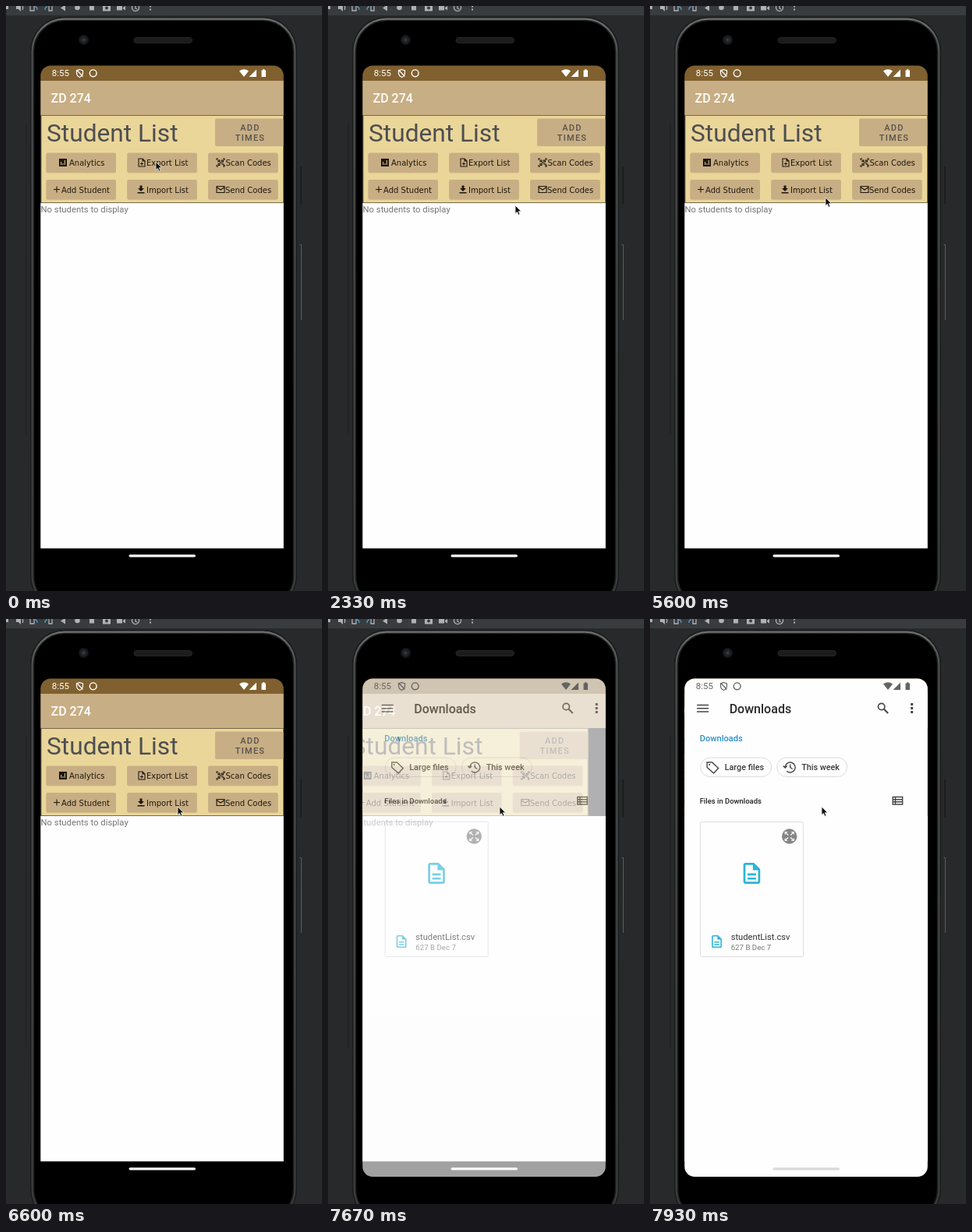
Animation of 405x751 px, one loop 8 s. Source, as an HTML page:

```html
<!DOCTYPE html>
<html lang="en">
<head>
<meta charset="utf-8">
<title>Student list</title>
<style>
html, body { margin: 0; width: 100%; height: 100%; overflow: hidden; background: #28292b; }
svg { display: block; width: 100vw; height: 100vh; }
text { font-family: Roboto, sans-serif; white-space: pre; }
.m { font-weight: 500; }
.label { font: 10px "DejaVu Sans", sans-serif; fill: #1d170d; }
.line { fill: none; stroke: currentColor; stroke-width: 2; }
.thin { stroke-width: 1.1; }
.solid { fill: currentColor; fill-rule: evenodd; }
</style>
</head>
<body>
<svg viewBox="0 0 405 751" preserveAspectRatio="none">
  <defs>
    <linearGradient id="rim" x2="0" y2="1">
      <stop offset="0" stop-color="#707171"/>
      <stop offset=".06" stop-color="#4c4d4d"/>
      <stop offset="1" stop-color="#3a3b3b"/>
    </linearGradient>
    <clipPath id="screen"><rect x="44.300" y="76.500" width="311.500" height="639.500" rx="13"/></clipPath>
    <clipPath id="import"><rect x="155" y="223" width="90" height="25.500" rx="2"/></clipPath>
  </defs>

  <!-- emulator toolbar -->
  <rect width="405" height="12" fill="#393c3e"/>
  <g fill="#afb1b3" color="#afb1b3">
    <path d="M0 0h3v4H0zM13 0h3l3-2v9l-3-3h-3zM70 2.500l6-4v8zM107 0h6v5.500h-6zM124 0h10v6.500h-10zM142 0h7v5.500h-7zM150 2l3-2v5.500l-3-2z"/>
    <circle cx="91.500" cy="2" r="3.300"/>
    <circle cx="129" cy="2.500" r="2" fill="#393c3e"/>
    <path class="line" style="stroke-width:1.300" d="M21 0q1.500 2 0 5M31 0v6h5V0M55 0v6h4V0M162 0a4.500 4.500 0 1 0 8 0M166 0v3l2 1"/>
    <path fill="none" stroke="#4a9cc9" stroke-width="1.400" d="M37 1q3 0 3 4M53 1q-3 0-3 4"/>
    <path d="M184 0h2v1.500h-2zM184 3.500h2v2h-2z"/>
  </g>

  <!-- phone body -->
  <g fill="none">
    <path stroke="#1b1c1d" stroke-width="2" d="M378 206v48"/>
    <path stroke="#222325" stroke-width="1.500" d="M26 150v400"/>
    <path stroke="#5c5d5e" d="M376.500 306.500h2V403"/>
  </g>
  <rect x="31" y="14" width="342" height="762" rx="44" fill="#1a1b1b"/>
  <rect x="32.500" y="15.500" width="339" height="759" rx="42.500" fill="url(#rim)"/>
  <rect x="35.500" y="18.500" width="333" height="753" rx="39.500" fill="#000" stroke="#202121" stroke-width="1.500"/>
  <circle cx="99.500" cy="43.500" r="5.500" fill="#202326" stroke="#151617" stroke-width="2"/>
  <circle cx="99.500" cy="43.500" r="2" fill="#34393c"/>
  <rect x="164" y="40.500" width="74.500" height="7" rx="3.500" fill="#1c1c1c" stroke="#262626"/>

  <g clip-path="url(#screen)">
    <rect x="44" y="76" width="313" height="20.500" fill="#80602f"/>
    <rect x="44" y="96" width="313" height="44.500" fill="#c8ae84"/>
    <rect x="44" y="140" width="313" height="113" fill="#2a2a30"/>
    <rect x="44" y="253" width="313" height="443.300" fill="#fefefe"/>
    <g id="list">
      <text class="m" x="57.500" y="124.300" font-size="16" fill="#fff">ZD 274</text>
      <rect x="45" y="140.500" width="310.500" height="112" fill="#ead699" stroke="#75694d"/>
      <text x="52" y="173.500" font-size="31.700" fill="#4d4e50">Student List</text>
      <rect x="268" y="144.500" width="87.500" height="35.500" rx="2" fill="#c8ae84"/>
      <g font-size="11" letter-spacing="1.200" text-anchor="middle" fill="#55524c">
        <text class="m" x="313" y="160">ADD</text>
        <text class="m" x="313" y="173">TIMES</text>
      </g>
      <g id="buttons" color="#1d170d"></g>
      <text x="44.500" y="265" font-size="11.300" fill="#757575">No students to display</text>
    </g>
    <g id="page" opacity="0">
      <rect x="44" y="76" width="313" height="641" fill="#fefefe"/>
      <g id="files" color="#454545">
        <path class="line" style="stroke-width:1.600" d="M60 110.500h15M60 114.800h15M60 119h15"/>
        <text class="m" x="101.500" y="121" font-size="16" fill="#2b2b2b">Downloads</text>
        <circle class="line" cx="296.500" cy="112.500" r="4.200" style="stroke-width:1.700"/>
        <path class="line" d="M299.500 115.500l5.500 5.500"/>
        <path fill="#454545" d="M334 108h3v3h-3zM334 113h3v3h-3zM334 118h3v3h-3z"/>
        <text class="m" x="63.500" y="157" font-size="11.100" fill="#2d8dcb">Downloads</text>
        <g fill="none" stroke="#dcdcdc">
          <rect x="64.500" y="178" width="91" height="24.500" rx="12.250"/>
          <rect x="162.500" y="178" width="90" height="24.500" rx="12.250"/>
          <rect x="64.500" y="260.500" width="132" height="173" rx="1"/>
        </g>
        <path class="line" style="stroke-width:1.400" d="M73 184h6.500l8 7.500-6 6.500-8.500-7.500z"/>
        <circle cx="76" cy="187" r="1.100" fill="#454545"/>
        <path class="line" style="stroke-width:1.400" d="M173 190.500a6.500 6.500 0 1 1 2 4.700M170.500 188.500l2.500 2.500 2.500-2.500M179.500 186.500v4l3 2"/>
        <g fill="#3c3c3c" font-size="10.800">
          <text class="m" x="95.500" y="194">Large files</text>
          <text class="m" x="194" y="194">This week</text>
          <text class="m" x="63.500" y="237" font-size="9.450" fill="#222">Files in Downloads</text>
        </g>
        <path class="line" style="stroke-width:1.400" d="M311 228.500h12.500v9.500H311zM311 231.700h12.500M311 234.800h12.500M314.300 228.500v9.500"/>
        <circle cx="178.500" cy="279" r="9.700" fill="#858585"/>
        <path fill="none" stroke="#fff" stroke-width="1.100" d="M173 276.500v-3h3M173 273.500l4 4M181 273.500h3v3M184 273.500l-4 4M173 281.500v3h3M173 284.500l4-4M181 284.500h3v-3M184 284.500l-4-4"/>
        <g id="docs" fill="#2bb5d8"></g>
        <text x="103.500" y="411.500" font-size="11.200" fill="#333">studentList.csv</text>
        <text x="103.500" y="425" font-size="9.700" fill="#757575">627 B Dec 7</text>
      </g>
    </g>
    <g id="status">
      <text x="58.700" y="90.300" font-size="11.500" fill="currentColor">8:55</text>
      <path class="line" style="stroke-width:1.200" d="M94.500 81.500l4 1.500v3q0 3.500-4 5.500-4-2-4-5.500v-3zM90.500 82l8 8.500"/>
      <circle class="line" cx="111.700" cy="86.300" r="4.400" style="stroke-width:1.400"/>
      <path fill="currentColor" d="M299 83.500q6-4.500 12 0l-6 7.500zM321 81.500V91h-9.500zM327.500 82.500h1.500v-1.200h2.500v1.200h1.500V91h-5.500z"/>
    </g>
    <rect id="pill" x="157.500" y="704.200" width="85.500" height="3.300" rx="1.650"/>
  </g>
  <path id="cursor" fill="#111" stroke="#fff" stroke-width=".7" d="M0 0v10.500l2.400-2.100 1.700 3.800 1.900-.8-1.700-3.700h3.300z"/>
</svg>
<script>
const $ = id => document.getElementById(id);
const clamp = v => Math.min(1, Math.max(0, v));
const ramp = (t, a, b) => clamp((t - a) / (b - a));
const grey = v => `rgb(${v},${v},${v})`;

const DOC = 'M8 16h8v2H8zm0-4h8v2H8zm6-10H6c-1.100 0-2 .9-2 2v16c0 1.100.9 2 2 2h12c1.100 0 2-.9 2-2V8zm4 18H6V4h7v5h5z';
const doc = (x, y, scale) => `<path d="${DOC}" transform="translate(${x} ${y}) scale(${scale})"/>`;
$('docs').innerHTML = doc(114.1, 310.3, 1.35) + doc(75.8, 404.4, .8);

// label, text x, icon x, icon style, icon outline in a 12-unit box
const buttons = [
  ['Analytics', 81, 67, 'solid', 'M1 1h10v10H1zM3 5h1.200v4H3zM5.400 7h1.200v2H5.400zM7.800 3H9v6H7.800z'],
  ['Export List', 180, 168, 'line thin', 'M2 1h5l3 3v7H2zM7 1v3h3M6 5.500v4M4 7.500h4'],
  ['Scan Codes', 281.5, 269, 'line thin', 'M1 3V1h2M9 1h2v2M11 9v2H9M3 11H1V9M3 3h2v2H3zM7.500 3h2v2h-2zM3 7.500h2v2H3zM7 7h1v1h2v2M5 6h2'],
  ['Add Student', 71, 59, 'line thin', 'M6 2v8M2 6h8'],
  ['Import List', 180, 167, 'solid', 'M1.500 9.500h9V11h-9zM4.500 1h3v3.500H10l-4 4-4-4h2.500z'],
  ['Send Codes', 281, 269, 'line thin', 'M1 2h10v8H1zM1 3l5 3.500L11 3']
];
$('buttons').innerHTML = buttons.map(([label, tx, ix, style, d], i) => {
  const x = 51.5 + i % 3 * 103.8, y = i < 3 ? 188.5 : 223;
  return `<rect x="${x}" y="${y + .5}" width="89.500" height="25.500" rx="2" fill="#a88f5f" opacity=".35"/>
    <rect x="${x}" y="${y}" width="89.500" height="25.300" rx="2" fill="#c8ae84"/>
    ${label === 'Import List' ? '<circle id="ripple" cx="220" cy="241" fill="#33291a" clip-path="url(#import)"/>' : ''}
    <path class="${style}" transform="translate(${ix} ${y + 6.5})" d="${d}"/>
    <text class="label" x="${tx}" y="${y + 16.5}">${label}</text>`;
}).join('');

// time, x, y of the pointer tip
const path = [
  [0, 192, 200], [610, 192, 200], [1000, 260, 267], [1400, 260, 267], [1470, 260, 266],
  [1870, 242, 258], [2220, 242, 258], [2330, 240, 256], [3670, 240, 256], [3730, 236, 252],
  [4000, 235, 251.5], [4410, 235, 251.5], [4600, 231, 251], [5010, 231, 251], [5600, 225, 246],
  [5800, 211, 236.5], [5870, 211, 236.5], [6000, 220, 243], [6340, 220, 243], [6600, 220, 241], [8000, 220, 241]
];
function pointer(t) {
  const i = path.findIndex(k => k[0] > t);
  const [a, b] = [path[i - 1], path[i]], u = ramp(t, a[0], b[0]);
  return [a[1] + (b[1] - a[1]) * u, a[2] + (b[2] - a[2]) * u];
}

// fast start and very slow end, built from two cubic curves
const bezier = (a, b, c, d, s) => {
  const r = 1 - s;
  return a * r * r * r + 3 * b * s * r * r + 3 * c * s * s * r + d * s * s * s;
};
function ease(u) {
  const [xs, ys] = u < 1 / 6
    ? [[0, .05, .13333, 1 / 6], [0, 0, .06, .4]]
    : [[1 / 6, .20833, .25, 1], [.4, .82, 1, 1]];
  let lo = 0, hi = 1;
  for (let i = 0; i < 20; i++) {
    const mid = (lo + hi) / 2;
    if (bezier(...xs, mid) < u) lo = mid; else hi = mid;
  }
  return bezier(...ys, (lo + hi) / 2);
}

const OPEN = 7570, SHIFT = 31;
function draw(now) {
  const t = now % 8000;
  const p = ease(ramp(t, OPEN, OPEN + 450));
  $('cursor').setAttribute('transform', `translate(${pointer(t)})`);
  $('ripple').setAttribute('r', 85 * ramp(t, 7130, 7360));
  $('ripple').setAttribute('opacity', .24 * (1 - ramp(t, 7430, 7660)));
  $('list').setAttribute('transform', `translate(${-SHIFT * p})`);
  $('files').setAttribute('transform', `translate(${SHIFT * (1 - p)})`);
  $('page').setAttribute('opacity', ramp(t, OPEN + 45, OPEN + 133));
  $('status').setAttribute('color', grey(255 - 155 * ramp(t, OPEN, OPEN + 100)));
  $('pill').setAttribute('fill', grey(250 - 32 * ramp(t, 7670, 7850)));
  requestAnimationFrame(() => draw(performance.now()));
}
draw(performance.now());
</script>
</body>
</html>
```
